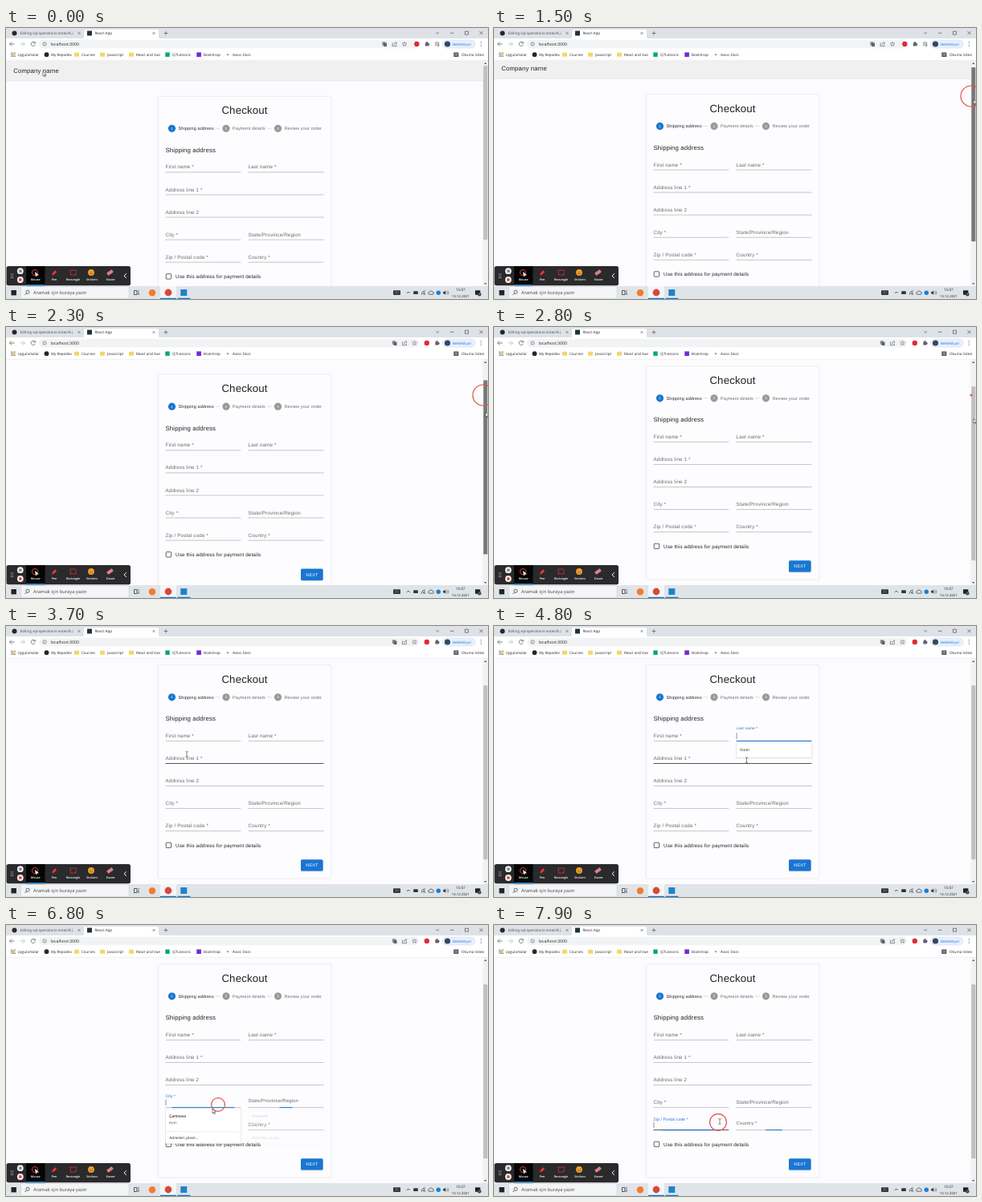
Write an HTML page that moves like this. It is 600 px wide and 338 px high and loops after 8000 ms.

```html
<!DOCTYPE html>
<html lang="tr">
<head>
<meta charset="utf-8">
<title>Checkout</title>
<style>
html, body { margin: 0; width: 100%; height: 100%; overflow: hidden; background: #fcfbfd; }
svg { display: block; width: 600px; height: 338px; font-family: "Open Sans", "Noto Sans", sans-serif; text-rendering: geometricPrecision; }
.page { font-family: "Liberation Sans", Arial, sans-serif; letter-spacing: .009em; }
</style>
</head>
<body>
<svg id="stage" viewBox="0 0 600 338"></svg>
<script>
const stage = document.getElementById('stage');
const LOOP = 8000, STEP = 100, MAX_SCROLL = 36.5;
const BLUE = '#1976d2', INK = '#262626', GREY = '#5f6368';

// Drawing helpers; text is placed by its vertical centre.
const text = (x, y, s, size = 4.5, fill = INK, more = '') =>
  `<text x="${x}" y="${y + size * .35}" font-size="${size}" fill="${fill}" ${more}>${s}</text>`;
const rect = (x, y, w, h, fill, more = '') =>
  `<rect x="${x}" y="${y}" width="${w}" height="${h}" fill="${fill}" ${more}/>`;
const circle = (x, y, r, fill, more = '') =>
  `<circle cx="${x}" cy="${y}" r="${r}" fill="${fill}" ${more}/>`;
const line = (d, stroke = GREY, width = .8, more = '') =>
  `<path d="${d}" fill="none" stroke="${stroke}" stroke-width="${width}" ${more}/>`;
const cross = (x, y, r, color, w) => line(`M${x - r} ${y - r}l${2 * r} ${2 * r}m0 ${-2 * r}l${-2 * r} ${2 * r}`, color, w);
const MID = 'text-anchor="middle"';
const clamp = (v, a = 0, b = 1) => Math.min(b, Math.max(a, v));
const easeOut = p => 1 - (1 - clamp(p)) ** 3;

const LEFT = 198.5, RIGHT = 301.6, HALF = 93.8, FULL = 196.9;
const fields = [
  ['First name *', LEFT, HALF, 0], ['Last name *', RIGHT, HALF, 0],
  ['Address line 1 *', LEFT, FULL, 1], ['Address line 2', LEFT, FULL, 2],
  ['City *', LEFT, HALF, 3], ['State/Province/Region', RIGHT, HALF, 3],
  ['Zip / Postal code *', LEFT, HALF, 4], ['Country *', RIGHT, HALF, 4]
].map(([label, x, w, row]) => ({ label, x, w, y: 143.4 + row * 28.07 }));

const popups = { 1: ['Korel'], 4: ['Çamlıova', 'Evim'], 5: ['Günkent', 'Evim'] };

// Time, place and field of each click
const clicks = [
  [4080, 232, 138, 0], [4480, 338, 138, 1], [5080, 300, 167, 2], [5580, 282, 195, 3],
  [6180, 345, 222, 5], [6711, 264, 224, 4], [7280, 345, 250, 7], [7821, 279, 246, 6]
].map(([t, x, y, field], i, all) => ({ t, x, y, field, end: all[i + 1]?.[0] ?? LOOP }));

const path = [
  [0, 46, 54], [100, 46, 54], [950, 597, 86], [1400, 597, 87], [2660, 597, 114], [2850, 597, 114],
  [3400, 262, 150], [3700, 225, 160], [4000, 232, 138], [4100, 232, 138], [4400, 338, 138],
  [4500, 338, 138], [4800, 314.5, 167.5], [5000, 300, 167], [5100, 300, 167], [5500, 282, 195],
  [5600, 282, 195], [6100, 345, 222], [6250, 345, 222], [6700, 264, 224], [6800, 257, 229],
  [7200, 345, 250], [7350, 345, 250], [7800, 279, 246], [7900, 281, 245], [8000, 281, 245]
];
function pointer(t) {
  const i = path.findIndex(p => p[0] > t), a = path[i - 1], b = path[i];
  const p = (t - a[0]) / (b[0] - a[0]);
  return [a[1] + (b[1] - a[1]) * p, a[2] + (b[2] - a[2]) * p];
}

const folder = x => rect(x - 3, 30.7, 6, 5, '#f7d36b', 'rx=".7"');

function browser() {
  let s = rect(0, 0, 600, 13.2, '#dee1e6') + rect(0, 13, 600, 27.5, '#fff') +
    `<path d="M95 13.2q2 0 2-2V4q0-2 2-2h89q2 0 2 2v7.2q0 2 2 2z" fill="#fff"/>` +
    circle(10.5, 6.5, 3, '#24292e') + text(17.5, 6.5, 'Editing sql-operations-notes/8.2', 4.5, '#45494d') +
    rect(83, 2, 5, 9, '#dee1e6', 'opacity=".7"') + cross(91, 6.5, 1.4, GREY, .7) +
    rect(101, 3.5, 6, 6, '#20333b') + text(110.5, 6.5, 'React App', 4.6) + cross(184, 6.5, 1.4, GREY, .7) +
    line('M196.7 6.5h4.6M199 4.2v4.6') +
    line('M535.3 5.3l1.9 1.9l1.9-1.9M553 6.3h4.4M571.5 4.2h4v4h-4z', '#333', .6) + cross(591.5, 6.2, 2, '#333', .6);
  s += line('M10.5 20h-6m2.6-2.6l-2.6 2.6l2.6 2.6') + line('M17.5 20h6m-2.6-2.6l2.6 2.6l-2.6 2.6', '#b6b9bd') +
    line('M36 18.6a2.6 2.6 0 1 0 .3 2M36.3 17v2h-2') + rect(41, 14.7, 473, 10.6, '#f1f3f4', 'rx="5.3"') +
    circle(48, 20, 2.2, 'none', `stroke="${GREY}" stroke-width=".6"`) + line('M48 19.7v1.4M48 18.6v.5', GREY, .6) +
    text(55.5, 20, 'localhost:3000', 5.25) +
    rect(543.5, 15, 40.5, 10, '#e8f0fe', 'rx="5" stroke="#c9d8f4" stroke-width=".5"') +
    circle(549.5, 20, 3.6, '#34495f') + text(556, 20, 'Bekletiliyor', 4.5, BLUE) +
    [17.7, 20, 22.3].map(y => circle(591.3, y, .6, GREY)).join('');
  const dots = ['#ea4335', '#fbbc04', '#34a853', '#4285f4'];
  for (let i = 0; i < 9; i++) s += rect(6.3 + i % 3 * 2, 30.6 + (i / 3 | 0) * 2, 1.4, 1.4, dots[i % 4]);
  s += circle(50.5, 33.2, 2.9, '#24292e') + [88, 120, 156].map(folder).join('') +
    rect(198.3, 30.5, 5.4, 5.4, '#04aa6d') + rect(237.3, 30.4, 5.6, 5.6, '#6f2bd9') + circle(276, 33.2, 1, '#777') +
    rect(557.3, 30.5, 6, 5.4, '#4a4d51', 'rx=".6"') + line('M558.5 32.3h3.6M558.5 34.2h3.6', '#fff', .6);
  [[14.5, 'Uygulamalar'], [56, 'My Repodex'], [94, 'Courses'], [126, 'Javascript'], [162, 'React and Vue'],
   [207, 'Q7Lessons'], [246, 'Bootstrap'], [282, 'Axios Docs'], [567, 'Okuma listesi']]
    .forEach(([x, label]) => s += text(x, 33.2, label, 4.5));
  return s + line('M0 40.3h600', '#e2e3e6', .5);
}

function taskbar() {
  let s = rect(0, 322, 600, 16, '#dfe4e9') + rect(6.5, 327, 6.4, 6.4, '#222') +
    rect(18.5, 322.4, 134.5, 15.3, '#f4f5f6', 'stroke="#c7cbcf" stroke-width=".5"') +
    circle(27, 329.3, 2.1, 'none', 'stroke="#333" stroke-width=".7"') + line('M25.5 330.9l-2 2', '#333') +
    text(34, 330, 'Aramak için buraya yazın', 5.75, '#444') +
    line('M159.5 327.5h3.5v5h-3.5zM165 327v1.5m0 1v3.5', '#333', .8) +
    rect(192, 322, 20, 16, '#f3f5f7') + circle(182, 330.3, 4.2, '#f47b2a') + circle(202, 330, 4.4, '#d9483b') +
    rect(217.3, 326, 8, 8, '#1f83ca') + rect(192, 336.8, 20, 1.2, '#0a74c9') + rect(213.5, 336.8, 16, 1.2, '#0a74c9');
  s += rect(482, 327.3, 9, 5.6, '#2d2d2d', 'rx=".8"') + line('M483.5 329h6M483.5 331h6', '#ddd', .6, 'stroke-dasharray=".8 .6"') +
    line('M498.8 331l2-2l2 2', '#333', .8) + rect(507.2, 328.3, 5.6, 3.6, '#333', 'rx=".4"') +
    line('M517.2 332.4a4.5 4.5 0 0 1 4.5-4.5M519.2 332.4a2.5 2.5 0 0 1 2.5-2.5', '#333', .8) + circle(521.3, 332, .7, '#333') +
    line('M527 332.2a1.5 1.5 0 0 1 .2-3a2 2 0 0 1 3.7 0a1.5 1.5 0 0 1 .1 3z', '#333', .7) + circle(538.3, 330.2, 2.7, '#1180d8') +
    `<path d="M544 329.2h1.4l1.8-1.6v5.2l-1.8-1.6h-1.4z" fill="#333"/>` +
    line('M548.4 328.8a2 2 0 0 1 0 2.8M549.8 327.6a4 4 0 0 1 0 5.2', '#333', .5) +
    text(565.8, 326, '15:07', 4.6, '#222', MID) + text(565.8, 334, '13.12.2021', 4.3, '#222', MID) +
    rect(584, 327.3, 6.4, 5.5, '#222', 'rx=".6"') + circle(589.3, 332.3, 2.3, '#444') + text(589.3, 332.3, '1', 3, '#fff', MID);
  return s;
}

function recorder() {
  let s = rect(.5, 297, 154.5, 24.3, '#2a2a2c', 'rx="2.5"') + rect(25, 297, 23.5, 24.3, '#050505') + rect(25, 320, 23.5, 1.2, '#1c8fe0');
  for (let i = 0; i < 6; i++) s += circle(6.4 + i % 2 * 2.1, 306.8 + (i / 2 | 0) * 2.3, .6, '#ccc');
  s += circle(17.8, 303.2, 3.9, '#f2f2f2') + line('M16.9 301.6v3.2M18.7 301.6v3.2', '#222', .9) +
    circle(17.8, 314, 3.9, '#f2f2f2') + rect(16.2, 312.4, 3.2, 3.2, '#e33a35') +
    circle(36, 305, 3.6, 'none', 'stroke="#e8463f" stroke-width=".9"') + `<path d="M36 304l5 4.2l-2.5.2l-1.3 2z" fill="#fff"/>` +
    `<path d="M57.2 308.5l.8-3l3.2-3.2l2 2l-3.2 3.2z" fill="#f03434"/>` +
    rect(80.2, 302, 7, 6, 'none', 'stroke="#f03434" stroke-width="1" stroke-dasharray="1.5 .7"') +
    circle(106, 305, 3.9, '#f3a52c') + circle(104.7, 304.2, .5, '#5b3200') + circle(107.3, 304.2, .5, '#5b3200') + line('M104 306q2 2 4 0', '#5b3200', .6) +
    rect(125.5, 303, 8, 4, '#dc7f86', 'rx=".8" transform="rotate(-35 129.5 305)"') +
    line('M149.8 306.3l-2.7 2.8l2.7 2.8', '#fff', 1);
  [[36.7, 'Mouse'], [60, 'Pen'], [83.5, 'Rectangle'], [107, 'Stickers'], [130.3, 'Eraser']]
    .forEach(([x, label]) => s += text(x, 313.8, label, 3.7, '#fff', MID + ' font-weight="600"'));
  return s;
}

function toolbarIcons(t) {
  const x = t < 1900 ? 0 : 12.5;
  const icons = rect(468.3, 17.3, 4, 4.4, '#8a8e93', 'rx=".5"') + rect(470, 18.6, 4, 4.4, GREY, 'rx=".5"') +
    line('M482 19h-1v3.6h5v-2M483 21q0-2.5 3.2-2.5m-1.2-1.3l1.4 1.3l-1.4 1.3', GREY, .7) +
    line('M496 17.2l.8 1.9l2 .1l-1.6 1.3l.6 2l-1.8-1.1l-1.8 1.1l.6-2l-1.6-1.3l2-.1z', GREY, .6) +
    circle(511.3, 20, 3.2, '#e02b35') + rect(521.8, 18.3, 4.4, 4.2, GREY, 'rx=".6"') + circle(524, 18, 1, GREY) + circle(526.3, 20.4, 1, GREY);
  const media = x ? '' : line('M533.8 18h4.5M533.8 19.8h4.5M533.8 21.6h2.5M538.7 18v4', GREY, .7) + circle(538, 22, .9, GREY);
  return `<g transform="translate(${x})">${icons}</g>${media}`;
}

function staticForm() {
  const steps = [[206.5, 'Shipping address'], [274, 'Payment details'], [338.5, 'Review your order']];
  return rect(0, 4, 594, 25.4, '#f1f0f1') + line('M0 29.4h594', '#dcdbdd', .6) +
    text(9.2, 16.5, 'Company name', 7.8, '#222') +
    rect(189.2, 48.7, 215.6, 266.4, '#fdfcfe', 'rx="1.6" stroke="#e0e0e2" stroke-width=".6"') +
    text(297, 66.3, 'Checkout', 13.28, '#222', MID) +
    steps.map(([x, label], i) => circle(x, 88.8, 4.6, i ? '#999' : BLUE) + text(x, 88.8, i + 1, 4.3, '#fff', MID) +
      text(x + 8, 88.6, label, 5.45, i ? '#6b6b6b' : INK)).join('') +
    line('M260.5 88.8h5.8M325 88.8h5.8', '#bdbdbd', .5) +
    text(LEFT, 115.5, 'Shipping address', 7.8, '#222') +
    rect(199.2, 270.2, 6.4, 6.4, 'none', 'rx=".6" stroke="#555" stroke-width=".9"') +
    text(211, 273.4, 'Use this address for payment details', 6.25, '#222') +
    rect(367, 292, 27.6, 14.3, '#000', 'rx="1.6" opacity=".18"') + rect(367, 291.2, 27.6, 14.3, BLUE, 'rx="1.6"') +
    text(380.9, 298.4, 'NEXT', 5.47, '#fff', MID + ' letter-spacing=".15"');
}

const hits = (f, [x, y]) => x > f.x && x < f.x + f.w && y > f.y - 13.5 && y < f.y + .6;

function fieldView(f, i, t, hovered) {
  const c = clicks.findLast(k => k.field === i && k.t <= t);
  const focused = c && t < c.end;
  const grow = !c ? 0 : focused ? easeOut((t - c.t) / 200) : 1 - easeOut((t - c.end) / 200);
  const half = f.w * grow / 2, mid = f.x + f.w / 2;
  return text(f.x, f.y - 6.6 - 9.4 * grow, f.label, 6.25 * (1 - .25 * grow), focused ? BLUE : '#6b6b6b') +
    line(`M${f.x} ${f.y}h${f.w}`, hovered ? '#333' : '#8d8d8d', hovered ? .85 : .5) +
    (grow > .01 ? line(`M${mid - half} ${f.y}h${half * 2}`, BLUE, 1) : '') +
    (focused && (t - c.t) % 1000 < 500 ? line(`M${f.x + .5} ${f.y - 10}v7.4`, '#2d4f78', .6) : '');
}

function popupView(t) {
  return clicks.map(c => {
    const rows = popups[c.field], alpha = t < c.t ? 0 : 1 - clamp((t - c.end) / 105);
    if (!rows || !alpha) return '';
    const { x, w, y } = fields[c.field], top = y + 1.6, h = rows[1] ? 43.6 : 19.2, left = x + 4.7;
    return `<g opacity="${alpha}">` + rect(x - .4, top + .5, w + 1.2, h + .6, '#000', 'rx="1.2" opacity=".13"') +
      rect(x, top, w + .4, h, '#fff', 'rx="1" stroke="#ddd" stroke-width=".4"') +
      (rows[1] ? text(left, top + 9.4, rows[0], 4.7, INK, 'font-weight="600"') + text(left, top + 17.8, rows[1], 4.2, '#444') +
        line(`M${x} ${top + 28.6}h${w}`, '#e0e0e0', .5) + text(left, top + 36.5, 'Adresleri yönet...', 4.6)
        : text(left, top + 9, rows[0], 4.7)) + '</g>';
  }).join('');
}

function clickRing(t) {
  const presses = [{ x: 594, y: 85, t: 1000, up: 2740 }, ...clicks.map(c => ({ ...c, up: c.t + 66 }))];
  return presses.map(p => {
    const r = 13 - Math.max(0, t - p.up) * .2;
    return t >= p.t && r > 0 ? circle(p.x, p.y, r, 'none', 'stroke="#e2504b" stroke-width="1.2"') : '';
  }).join('');
}

function cursor([x, y], beam) {
  const d = beam ? 'M-1.6-3.4q1.6 0 1.6.8v5.2q0 .8-1.6.8M1.6-3.4q-1.6 0-1.6.8M1.6 3.4q-1.6 0-1.6-.8'
    : 'M0 0v6l1.4-1.3l1 2.2l.9-.4l-1-2.2h1.9z';
  return `<path transform="translate(${x} ${y})" d="${d}" fill="${beam ? 'none' : '#fff'}" stroke="#333" stroke-width=".6"/>`;
}

const form = staticForm(), frameParts = browser() + taskbar() + recorder();

function render(t) {
  const scroll = clamp((t - 1400) * .029, 0, MAX_SCROLL), at = pointer(t);
  const overPopup = t >= 6711 && t < 7280 && at[1] > 228;
  const over = scroll < MAX_SCROLL || overPopup ? -1 : fields.findIndex(f => hits(f, at));
  const dragging = t >= 1000 && t < 2750;
  stage.innerHTML = rect(0, 0, 600, 338, '#fcfbfd') +
    `<g class="page" transform="translate(0 ${MAX_SCROLL - scroll})">${form}` +
    fields.map((f, i) => fieldView(f, i, t, i === over)).join('') + '</g>' +
    rect(593.6, 40, 6.4, 282, '#f1f1f2') + rect(594.3, 47 + scroll * .745, 5, 217, dragging ? '#787878' : '#bfbfc0') +
    `<path d="M595.2 45l1.6-2l1.6 2zM595.2 318l1.6 2l1.6-2z" fill="#555"/>` +
    popupView(t) + frameParts + toolbarIcons(t) + clickRing(t) + cursor(at, over >= 0);
}

const start = performance.now();
let shown = -1;
function tick() {
  const t = Math.floor((performance.now() - start) % LOOP / STEP) * STEP;
  if (t !== shown) render(shown = t);
  requestAnimationFrame(tick);
}
tick();
</script>
</body>
</html>
```
